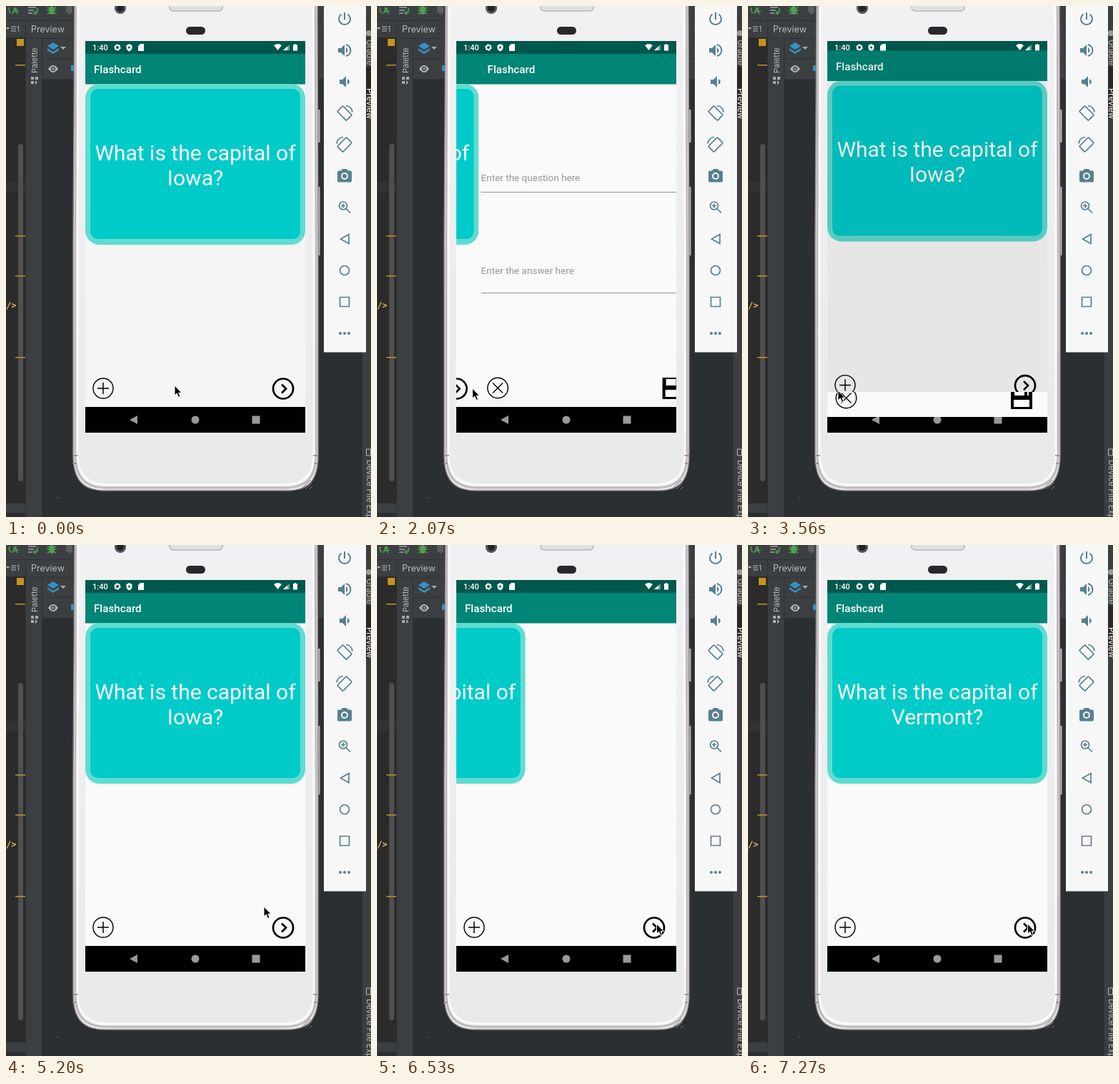
Recreate the animation shown at these times as an HTML page. Size 511 px wide and 715 px high, loop 8 s.

```html
<!DOCTYPE html>
<html lang="en">
<head>
<meta charset="utf-8">
<title>Flashcard app demo</title>
<style>
html, body { margin: 0; width: 100%; height: 100%; overflow: hidden; background: #2c2f32; }
svg { display: block; }
text { font-family: Roboto, "Open Sans", sans-serif; }
.ide { font-family: Inter, "Open Sans", sans-serif; fill: #bbb; }
.line { fill: none; stroke: #000; }
.title { font-size: 15.2px; font-weight: 500; fill: #fff; }
.ask { font-size: 30px; fill: #fff; text-anchor: middle; }
.hint { font-size: 13.5px; fill: #979797; }
.tool { fill: #57808f; }
.tool .line { stroke: #57808f; stroke-width: 2; }
.tool .thin { stroke-width: 1.7; }
</style>
</head>
<body>
<svg width="511" height="715" viewBox="0 0 511 715">
  <defs>
    <clipPath id="screen"><rect x="111" y="49" width="308" height="548"/></clipPath>
    <clipPath id="cut"><rect id="cutBox" x="111" y="67" width="308" height="530"/></clipPath>
    <clipPath id="deck"><rect x="111" y="109" width="308" height="452"/></clipPath>
    <linearGradient id="metal" x2="0" y2="1">
      <stop offset="0" stop-color="#f1f1f3"/><stop offset="1" stop-color="#e7e9eb"/>
    </linearGradient>
  </defs>

  <!-- editor window -->
  <rect width="511" height="715" fill="#2c2f32"/>
  <path d="M0 0H511V20H0ZM27 20H511V102H50V715H27ZM0 20H27V44H0ZM498 102H511V715H498ZM0 696H27V709H0Z" fill="#3c3f41"/>
  <path d="M0 44H27V696H0Z" fill="#2b2b2b"/>
  <path d="M0 246H27V261H0Z" fill="#323232"/>
  <path d="M0 20.5H511M27.5 20V715M50.5 46V715M28 45.5H511M50 73.5H511M50 102.5H511M498.5 102V715" stroke="#2f3234" fill="none"/>
  <rect x="17" y="193" width="7" height="472" rx="3.5" fill="#4f4f4f"/>
  <path d="M13 82h14v1.500H13zM13 321h14v1.500H13zM13 377h14v1.500H13zM13 491h14v1.500H13zM15 46h10v10H15z" fill="#c4941c"/>
  <text x="0" y="423" font-size="12" font-weight="bold" fill="#e0b960" style="font-family:'DejaVu Sans Mono',monospace">/&gt;</text>
  <path d="M0 30h5l-2.500 3z" fill="#bbb"/>
  <path d="M7 29h7M7 32h7M7 35h7" stroke="#bbb"/>
  <text class="ide" x="15" y="36" font-size="10">1</text>
  <g fill="none" stroke="#4f9f55" stroke-width="1.600">
    <path d="M5 2a6 6 0 0 0 2 8M14 2v5h4M9 11l3-8 4 8M10 8h5"/>
    <path d="M31 2h11M31 6h8M31 10h6" stroke="#a0a4a6"/>
    <path d="M44 3v4a3 3 0 0 1-4 3m2-3-3 3 3 2"/>
    <path d="M58 2l4 2M70 2l-4 2M57 6h14M58 11l4-2M70 11l-4-2"/>
  </g>
  <ellipse cx="64" cy="6" rx="4" ry="6" fill="#4f9f55"/>
  <path d="M84 0h9v9l-4 3-5-4z" fill="#5b5e60"/>
  <text class="ide" x="35" y="37" font-size="12.500">Preview</text>
  <text class="ide" transform="translate(44 94) rotate(-90)" font-size="11">Palette</text>
  <path d="M35 99h4v4h-4zM41 99h4v4h-4zM35 105h4v4h-4zM41 104l3 3-3 3z" fill="#aaa"/>
  <path d="M66 51l8 5-8 5-8-5z" fill="#3592c4"/>
  <path d="M58 59l8 5 8-5v3l-8 5-8-5z" fill="#3592c4"/>
  <path d="M76 57h8l-4 4z" fill="#aaa"/>
  <path d="M59 88q7-10 14 0q-7 10-14 0z" fill="#afb1b3"/>
  <circle cx="66" cy="88" r="3" fill="#3c3f41"/><circle cx="66" cy="88" r="1.500" fill="#afb1b3"/>
  <path d="M91 83h4v8h-4z" fill="#3592c4"/>
  <path d="M504 85h7v73h-7z" fill="#26282a"/>
  <circle cx="508" cy="38" r="4" fill="#9a9da0"/>
  <g font-size="11.500">
    <text class="ide" transform="translate(504.500 47) rotate(90)">Gradle</text>
    <text class="ide" transform="translate(504.500 115) rotate(90)" style="fill:#fff">Preview</text>
    <text class="ide" transform="translate(504.500 635) rotate(90)">Device File Explorer</text>
  </g>
  <path d="M504.500 620h6v9h-6z" class="line" style="stroke:#bbb"/>
  <path d="M72 688h1v1h-1z" fill="#aaa"/>

  <!-- phone -->
  <path d="M436 145h3.500v46H436zM436 253h3.500v96H436z" fill="#b9b5b7"/>
  <path d="M96 -5L94 330V628C94 661 106 678 138 678H394C426 678 437 661 437 628V330L436 -5Z" fill="url(#metal)" stroke="#8f878a" stroke-width="1.500"/>
  <path d="M98 -5L97 330V627C97 658 109 674 141 674H390C422 674 434 658 434 627V330L433 -5Z" fill="none" stroke="#bfb9bc" stroke-width="3"/>
  <path d="M101 -5L100 330V626C100 655 112 670 144 670H387C419 670 431 655 431 626V330L430 -5Z" fill="none" stroke="#fafafa" stroke-width="3"/>
  <path d="M94 629h7M430 629h7M93 640h6M431 640h6" stroke="#8f878a" stroke-width="1.500"/>
  <path d="M413 676l13-13M419 676l9-9M425 676l4-4" stroke="#77797b"/>
  <circle cx="160" cy="3" r="8" fill="#55565a"/><circle cx="160" cy="3" r="5" fill="#222328"/>
  <rect x="229" y="-6" width="74" height="13" rx="5" fill="#dfe0e2" stroke="#b8b6b9" stroke-width="1.500"/>
  <rect x="252" y="29" width="27" height="11" rx="5.500" fill="#27282c"/>

  <!-- phone screen -->
  <g clip-path="url(#screen)">
    <path d="M111 49h308v18H111z" fill="#00574b"/>
    <path d="M111 67h308v494H111z" fill="#fafafa"/>
    <path d="M111 561h308v36H111z"/>
    <path d="M184 573v12l-11-6zM344.500 573.500h11v11h-11z" fill="#999"/>
    <circle cx="265" cy="579" r="5.500" fill="#999"/>
    <g fill="#fff">
      <text x="121" y="62" font-size="11" font-weight="500">1:40</text>
      <circle cx="156" cy="58" r="3" fill="none" stroke="#fff" stroke-width="2"/>
      <circle cx="156" cy="58" r="4.300" fill="none" stroke="#fff" stroke-dasharray="2 2.500"/>
      <path d="M172.500 53l4 2v3q0 4-4 5.500q-4-1.500-4-5.500v-3z"/>
      <circle cx="172.500" cy="58" r="1.500" fill="#00574b"/>
      <path d="M188 53h5v10h-8v-7z"/>
      <path d="M375 55q5.500-4 11 0l-5.500 7z"/>
      <path d="M397 54v8h-9z" opacity=".45"/><path d="M394 56.500v5.500h-6z"/>
      <path d="M402 54h2v-1h2v1h2v8.500h-6z"/>
    </g>
    <g id="main">
      <path id="page" d="M111 109h308v452H111z"/>
      <path d="M111 67h308v42.500H111z" fill="#008577"/>
      <text class="title" x="123" y="94">Flashcard</text>
      <g clip-path="url(#deck)">
        <g id="card">
          <rect x="111" y="109" width="308" height="225" rx="20" fill="#60dcd0"/>
          <rect x="118" y="116" width="294" height="210" rx="11" fill="#00cbc9"/>
          <text class="ask" x="265" y="215.500">What is the capital of</text>
          <text class="ask" id="state" x="265" y="250.500"></text>
        </g>
      </g>
      <g class="line">
        <circle cx="136" cy="535" r="14" stroke-width="1.400"/>
        <path d="M128 535h16M136 527v16" stroke-width="1.500"/>
        <circle cx="388" cy="535.500" r="14" stroke-width="2.700"/>
        <path d="M386 529.500l6 6-6 6" stroke-width="2.700"/>
      </g>
      <path id="dim" d="M111 67h308v494H111z"/>
    </g>
    <g clip-path="url(#cut)">
      <g id="entry">
        <path d="M111 109h308v452H111z" fill="#fafafa"/>
        <path d="M110 67h309v42.500H110z" fill="#008577"/>
        <text class="title" x="123" y="94">Flashcard</text>
        <text class="hint" x="114" y="245">Enter the question here</text>
        <text class="hint" x="114" y="375">Enter the answer here</text>
        <path d="M114 260.500h302M114 401.500h302" stroke="#949494"/>
        <g class="line" stroke-width="1.400">
          <circle cx="137.500" cy="534.500" r="14.300"/>
          <path d="M130.500 527.500l14 14M144.500 527.500l-14 14"/>
        </g>
        <path d="M368 520h27l3 3v27h-30z"/>
        <path d="M373 522h14v9h-14zM391 522h2v9h-2zM372 537h22v10h-22z" fill="#fafafa"/>
      </g>
    </g>
    <path id="strip" d="M111 551h308v10H111z" fill="#f5f5f5"/>
  </g>

  <!-- emulator controls -->
  <path d="M445 0h59v484.500H445z" fill="#f7f7f7"/>
  <g class="tool">
    <path class="line" d="M474 9V19M469.500 11.500a8 8 0 1 0 9 0"/>
    <path d="M465 59h4l5-5v16l-5-5h-4zM476 58q5 4 0 8z"/>
    <path class="line" d="M476 54a8.200 8.200 0 0 1 0 16"/>
    <path d="M467 103h4l5-5v16l-5-5h-4zM478 102q6 4 0 8z"/>
    <g id="turn" class="line">
      <rect class="thin" x="468.500" y="141" width="11" height="18" rx="1" transform="rotate(-45 474 150)"/>
      <path class="thin" d="M476 139.500q8 1 9 9"/>
    </g>
    <use href="#turn" transform="translate(948 44) scale(-1 1)"/>
    <path d="M471 228h6l2 2.500h3q2 0 2 2v12q0 2-2 2h-16q-2 0-2-2v-12q0-2 2-2h3z"/>
    <circle cx="474" cy="238" r="4" stroke="#f7f7f7" stroke-width="2"/>
    <g class="line thin">
      <circle cx="472" cy="279.500" r="5.500"/>
      <path d="M476 283.500l6 6M469 279.500h6M472 276.500v6"/>
      <path d="M480 319.500v13l-11.500-6.500z"/>
      <circle cx="474" cy="370" r="6.500"/>
      <path d="M467.500 407.500h13v13h-13z"/>
    </g>
    <circle cx="468" cy="458" r="2"/><circle cx="474" cy="458" r="2"/><circle cx="480" cy="458" r="2"/>
  </g>

  <path id="cursor" d="M0 0V14L3.200 11L5.500 16.500L8 15.500L5.700 10.300H10Z" stroke="#fff" stroke-width="1" stroke-linejoin="round"/>
</svg>
<script>
const LOOP = 8000, TICK = 148.4, WIDTH = 308;
// pointer stops: tick, x, y
const stops = [
  [0, 236, 531], [2, 229, 538], [3, 196, 542], [4, 165, 542], [5, 145, 539], [6, 138, 536],
  [9, 133.5, 535], [18, 129, 538], [19, 126, 538], [21, 126, 538],
  [29, 150, 529], [30, 212, 512], [31, 270, 502], [32, 296, 506],
  [34, 328, 506], [35, 361, 506], [36, 372, 510], [37, 376, 514],
  [39, 386, 523], [40, 391.5, 530]
];
const el = id => document.getElementById(id);
const move = (id, x, y) => el(id).setAttribute('transform', `translate(${x} ${y})`);
const show = (id, on) => el(id).setAttribute('visibility', on ? 'visible' : 'hidden');
const part = (t, start, length) => Math.min(1, Math.max(0, (t - start) / length));
const slowDown = u => 1 - (1 - u) ** 2;
const smooth = u => (1 - Math.cos(Math.PI * u)) / 2;

function draw(time) {
  const tick = Math.floor((time % LOOP + 10) / TICK), t = tick * TICK;
  const closing = tick >= 24;

  const slide = slowDown(part(t, 1765, 460));
  const back = part(t, 24 * TICK, 2 * TICK), rest = closing ? (1 - back) ** 2 : 0;
  move('main', closing ? 0 : -WIDTH * slide, -4.4 * rest);
  move('entry', closing ? 0 : WIDTH * (1 - slide), closing ? 14 : 0);
  el('cutBox').setAttribute('y', closing ? 540 + 80 * back : 67);
  show('entry', tick >= 12 && tick < 25);
  el('dim').setAttribute('opacity', 0.08 * rest);
  el('page').setAttribute('fill', tick < 12 ? '#f5f5f5' : '#fafafa');
  show('strip', tick >= 12 && !closing);

  const next = t > 6720;
  const cardX = next ? 1 - smooth(part(t, 6722, 500)) : -smooth(part(t, 6218.8, 500));
  move('card', WIDTH * cardX, 0);
  el('state').textContent = next ? 'Vermont?' : 'Iowa?';

  const [, x, y] = stops.filter(s => s[0] <= tick).pop();
  move('cursor', x, y);
}

const begin = performance.now();
function run() {
  draw(performance.now() - begin);
  requestAnimationFrame(run);
}
run();
</script>
</body>
</html>
```
